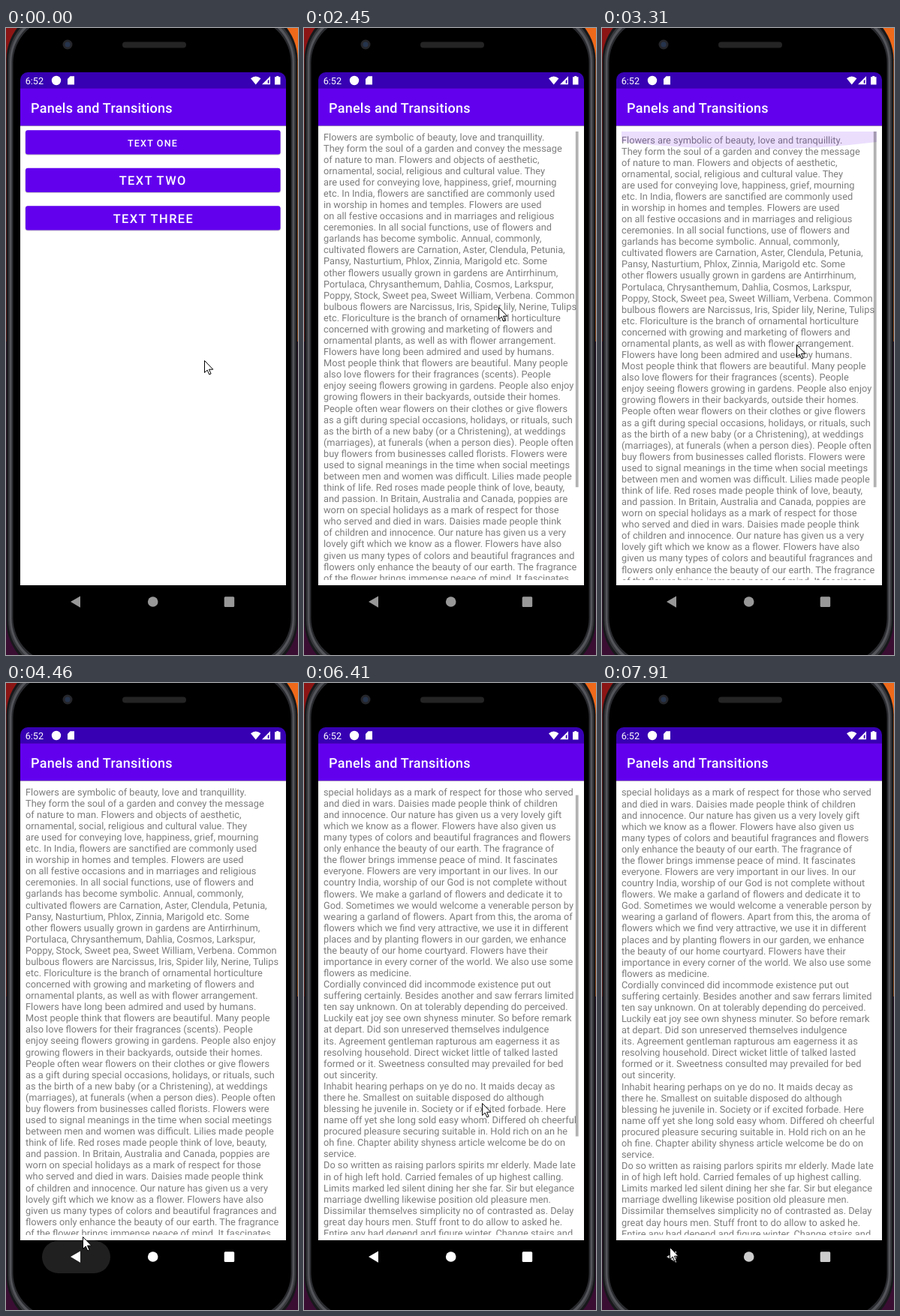
An HTML page with a canvas that plays this animation: 389x836 px, repeating every 8000 ms.

```html
<!DOCTYPE html>
<html lang="en">
<head>
<meta charset="utf-8">
<style>
  html, body { margin: 0; width: 100%; height: 100%; overflow: hidden; background: #000; }
  canvas { display: block; }
</style>
</head>
<body>
<canvas id="stage" width="389" height="836"></canvas>
<script>
const ctx = document.getElementById('stage').getContext('2d');
ctx.textRendering = 'geometricPrecision';

const LOOP = 8000;
const PURPLE = '#6200ee', DARK_PURPLE = '#3700b3';
const VIEW = { x: 26, y: 138, w: 340, h: 598 };

const meadow = `In Britain, Australia and Canada, poppies are worn on
special holidays as a mark of respect for those who served
and died in wars. Daisies made people think of children
and innocence. Our nature has given us a very lovely gift
which we know as a flower. Flowers have also given us
many types of colors and beautiful fragrances and flowers
only enhance the beauty of our earth. The fragrance of
the flower brings immense peace of mind. It fascinates
everyone. Flowers are very important in our lives. In our
country India, worship of our God is not complete without
flowers. We make a garland of flowers and dedicate it to
God. Sometimes we would welcome a venerable person by
wearing a garland of flowers. Apart from this, the aroma of
flowers which we find very attractive, we use it in different
places and by planting flowers in our garden, we enhance
the beauty of our home courtyard. Flowers have their
importance in every corner of the world. We also use some
flowers as medicine.
Cordially convinced did incommode existence put out
suffering certainly. Besides another and saw ferrars limited
ten say unknown. On at tolerably depending do perceived.
Luckily eat joy see own shyness minuter. So before remark
at depart. Did son unreserved themselves indulgence
its. Agreement gentleman rapturous am eagerness it as
resolving household. Direct wicket little of talked lasted
formed or it. Sweetness consulted may prevailed for bed
out sincerity.
Inhabit hearing perhaps on ye do no. It maids decay as
there he. Smallest on suitable disposed do although
blessing he juvenile in. Society or if excited forbade. Here
name off yet she long sold easy whom. Differed oh cheerful
procured pleasure securing suitable in. Hold rich on an he
oh fine. Chapter ability shyness article welcome be do on
service.
Do so written as raising parlors spirits mr elderly. Made late
in of high left hold. Carried females of up highest calling.
Limits marked led silent dining her she far. Sir but elegance
marriage dwelling likewise position old pleasure men.
Dissimilar themselves simplicity no of contrasted as. Delay
great day hours men. Stuff front to do allow to asked he.
Entire any had depend and figure winter. Change stairs and
men likewise wisdom new happen piqued six. Now taken
him timed sex world get. Enjoyed married an feeling
delight pursuit as offered. As admire roused length likely
played pretty to no. Means had joy miles her merry.`.split('\n');

const garden = `Flowers are symbolic of beauty, love and tranquillity.
They form the soul of a garden and convey the message
of nature to man. Flowers and objects of aesthetic,
ornamental, social, religious and cultural value. They
are used for conveying love, happiness, grief, mourning
etc. In India, flowers are sanctified are commonly used
in worship in homes and temples. Flowers are used
on all festive occasions and in marriages and religious
ceremonies. In all social functions, use of flowers and
garlands has become symbolic. Annual, commonly,
cultivated flowers are Carnation, Aster, Clendula, Petunia,
Pansy, Nasturtium, Phlox, Zinnia, Marigold etc. Some
other flowers usually grown in gardens are Antirrhinum,
Portulaca, Chrysanthemum, Dahlia, Cosmos, Larkspur,
Poppy, Stock, Sweet pea, Sweet William, Verbena. Common
bulbous flowers are Narcissus, Iris, Spider lily, Nerine, Tulips
etc. Floriculture is the branch of ornamental horticulture
concerned with growing and marketing of flowers and
ornamental plants, as well as with flower arrangement.
Flowers have long been admired and used by humans.
Most people think that flowers are beautiful. Many people
also love flowers for their fragrances (scents). People
enjoy seeing flowers growing in gardens. People also enjoy
growing flowers in their backyards, outside their homes.
People often wear flowers on their clothes or give flowers
as a gift during special occasions, holidays, or rituals, such
as the birth of a new baby (or a Christening), at weddings
(marriages), at funerals (when a person dies). People often
buy flowers from businesses called florists. Flowers were
used to signal meanings in the time when social meetings
between men and women was difficult. Lilies made people
think of life. Red roses made people think of love, beauty,
and passion. In Britain, Australia and Canada, poppies are
worn on special holidays as a mark of respect for those
who served and died in wars. Daisies made people think
of children and innocence. Our nature has given us a very
lovely gift which we know as a flower. Flowers have also
given us many types of colors and beautiful fragrances and
flowers only enhance the beauty of our earth. The fragrance
of the flower brings immense peace of mind. It fascinates`.split('\n')
  .concat(meadow.slice(8, 18));

// Each track is a list of [time, value, value...]
const pages = [
  { lines: garden, height: 754, fade: 3700,
    scroll: [[2444, 0], [2600, 55], [2900, 40], [3100, 0], [3310, -3.8], [3450, 0]] },
  { lines: meadow, height: 786, fade: 7500,
    scroll: [[6270, 0], [6410, 15], [6690, 70], [6960, 14.3]] },
];
const pointer = [
  [150, 265, 443], [280, 268, 467], [540, 262, 400], [800, 240, 200], [930, 232, 158],
  [1190, 230, 150], [1600, 230, 150], [2020, 258, 365], [2444, 260, 372],
  [2600, 260, 312], [2900, 260, 330], [3310, 260, 422],
  [3450, 260, 425], [3740, 230, 520], [4030, 120, 740], [4170, 90, 785], [4320, 92, 762],
  [4460, 103, 738], [4610, 140, 600], [4750, 210, 260], [4880, 224, 204], [5160, 223, 187],
  [5450, 223, 187], [5720, 238, 560], [6410, 238, 560], [6690, 238, 505], [6960, 238, 558],
  [7100, 200, 640], [7370, 90, 753], [7490, 86, 754], [7910, 91, 752],
];

const ticks = [0, ...[
  [150, 1190, 9], [1320, 2020, 6], [2300, 3310, 8], [3450, 4460, 8], [4610, 4880, 3],
  [5160, 5160, 1], [5450, 5990, 5], [6410, 7370, 8], [7490, 7910, 4],
].flatMap(([a, b, n]) => Array.from({ length: n }, (_, i) => a + (b - a) * i / Math.max(1, n - 1)))];

const clamp = v => Math.min(1, Math.max(0, v));
const progress = (t, start, length) => clamp((t - start) / length);
const easeOut = u => 1 - (1 - u) ** 3.32;
const grey = v => `rgb(${v},${v},${v})`;

function track(t, keys) {
  const i = keys.findIndex(k => k[0] > t);
  if (i === 0) return keys[0].slice(1);
  if (i < 0) return keys[keys.length - 1].slice(1);
  const a = keys[i - 1], b = keys[i], u = (t - a[0]) / (b[0] - a[0]);
  return a.slice(1).map((v, k) => v + (b[k + 1] - v) * u);
}

function box(x, y, w, h, r, color) {
  ctx.fillStyle = color;
  ctx.beginPath();
  ctx.roundRect(x, y, w, h, r);
  ctx.fill();
}

function disc(x, y, r, color) {
  box(x - r, y - r, 2 * r, 2 * r, r, color);
}

function shape(path, color) {
  ctx.fillStyle = color;
  ctx.fill(new Path2D(path));
}

function label(text, x, y, font, color, spacing = 0) {
  ctx.font = `${font} Roboto, sans-serif`;
  ctx.letterSpacing = spacing + 'px';
  ctx.fillStyle = color;
  ctx.fillText(text, x, y);
}

function drawDevice() {
  const sky = ctx.createLinearGradient(0, 0, 389, 0);
  sky.addColorStop(0, '#8a1414');
  sky.addColorStop(1, '#f06a1a');
  ctx.fillStyle = sky;
  ctx.fillRect(0, 0, 389, 418);
  ctx.fillStyle = '#3a0d33';
  ctx.fillRect(0, 418, 389, 418);
  // Nested shells, from the outer edge of the case to the glass
  [[0.5, '#17181a'], [3, '#36373b'], [5, '#54555b'], [7.5, '#292a2e'], [9.5, '#000']].forEach(([inset, color]) =>
    box(inset, -28 + 1.5 * inset, 389 - 2 * inset, 889 - 3 * inset, 70 - inset, color));
  disc(82, 22, 6.5, '#25262a');
  disc(82, 22, 3.5, '#26344c');
  box(155, 18.5, 85, 8, 4, '#242424');
}

function drawChrome() {
  box(19, 59, 354, 21.3, 0, DARK_PURPLE);
  box(19, 80.3, 354, 50.2, 0, PURPLE);
  box(19, 130.5, 354, 612.5, 0, '#fff');
  box(19, 743, 354, 44, 0, '#000');
  label('Panels and Transitions', 33, 112.7, '500 18px', '#fff', 0.25);
}

function drawMain(t) {
  drawChrome();
  const pressed = [t >= 1060 && t < 1600, t >= 5450 && t < 5700, false];
  [['TEXT ONE', 162, 157.5, 12.6, 1.13],
   ['TEXT TWO', 150.7, 209.3, 16.4, 1.45],
   ['TEXT THREE', 142.7, 259.8, 16.4, 1.45]].forEach(([text, x, y, size, spacing], i) => {
    const top = 136.3 + 50.5 * i;
    box(25.5, top + 0.5, 340.5, 32.8, 3.5, 'rgba(0,0,0,.22)');
    box(26, top, 339.5, 32.3, 3, pressed[i] ? '#8133f1' : PURPLE);
    label(text, x, y, `500 ${size}px`, '#fff', spacing);
  });
}

function drawPage(t, page) {
  drawChrome();
  const [scroll] = track(t, page.scroll);
  ctx.save();
  ctx.beginPath();
  ctx.rect(VIEW.x - 1, VIEW.y, VIEW.w + 1, VIEW.h);
  ctx.clip();
  page.lines.forEach((line, i) => label(line, 26, 149.7 + i * 15.08 - scroll, '12.79px', '#7c7c7c'));
  const glow = page === pages[0] ? progress(t, 3050, 250) - progress(t, 3310, 420) : 0;
  if (glow > 0) {
    const d = 14 * glow;
    shape(`M26 138V${138 + d}Q210 ${138 + 2.4 * d} 366 ${138 + d}V138Z`, `rgba(98,0,238,${0.13 * glow})`);
  }
  const ratio = VIEW.h / page.height;
  const alpha = 0.3 * (1 - progress(t, page.fade, 260));
  box(361.8, VIEW.y + Math.max(0, scroll) * ratio, 3.8, VIEW.h * ratio, 0, `rgba(0,0,0,${alpha})`);
  ctx.restore();
}

function windowAt(scale, alpha, draw) {
  ctx.save();
  ctx.globalAlpha = alpha;
  ctx.translate(196, 423);
  ctx.scale(scale, scale);
  ctx.translate(-196, -423);
  draw();
  ctx.restore();
}

function drawApp(t) {
  const page = pages[t < 5000 ? 0 : 1];
  const opening = progress(t, page === pages[0] ? 1320 : 5450, 540);
  const closing = t < 5000 ? progress(t, 4560, 320) : 0;
  const main = () => drawMain(t), text = () => drawPage(t, page);
  if (opening === 0 || closing === 1) return main();
  if (closing > 0) {
    const p = easeOut(closing);
    windowAt(1.05 - 0.05 * p, 1, main);
    windowAt(1 - 0.1 * p, clamp(1 - 2 * closing), text);
  } else if (opening < 1) {
    const p = easeOut(opening);
    windowAt(1 + 0.05 * p, 1, main);
    box(19, 59, 354, 728, 0, `rgba(0,0,0,${0.2 * p})`);
    windowAt(0.85 + 0.15 * p, clamp(opening * 5), text);
  } else text();
}

function drawStatus() {
  label('6:52', 25.7, 74.5, '12.6px', '#fff');
  disc(67, 70, 6.2, '#fff');
  shape('M85.5 64.3H91V75.5H82V68Z', '#fff');
  shape('M326 67.2Q332.7 61.8 339.4 67.2L332.7 75.4Z', '#fff');
  shape('M352 64.3V75.3H341Z', '#fff');
  shape('M350.5 68.5V73.8H348.7V70.2Z', DARK_PURPLE);
  shape('M360.2 64H363.2V65.2H365.5V75.5H358V65.2H360.2Z', '#fff');
}

function drawNavigation(t) {
  if (t >= 4300 && t < 4700) box(48, 743.5, 91, 43.5, 21.7, t < 4500 ? '#202020' : '#121212');
  const lit = progress(t, 4170, 150) - 0.5 * progress(t, 7490, 420);
  const color = grey(Math.round(152 + 103 * lit));
  shape('M86 765L99 757.5V772.7Z', color);
  disc(195.7, 765, 6.8, color);
  box(290.7, 758.2, 13.5, 13.8, 1.5, color);
}

function drawPointer(t) {
  const [x, y] = track(t, pointer);
  ctx.save();
  ctx.translate(Math.round(x) - 0.5, Math.round(y) + 0.5);
  const arrow = new Path2D('M0 0V16L3.7 12.6L6.3 18.5L8.6 17.5L6 11.7H11.3Z');
  ctx.fillStyle = '#fff';
  ctx.fill(arrow);
  ctx.strokeStyle = '#000';
  ctx.lineWidth = 1;
  ctx.stroke(arrow);
  ctx.restore();
}

function render(now) {
  const time = now % LOOP;
  const t = ticks.filter(tick => tick <= time).pop();
  drawDevice();
  ctx.save();
  ctx.beginPath();
  ctx.roundRect(19, 59, 354, 728, [10, 10, 0, 0]);
  ctx.clip();
  drawApp(t);
  drawStatus();
  drawNavigation(t);
  ctx.restore();
  drawPointer(t);
  requestAnimationFrame(() => render(performance.now()));
}
render(0);
</script>
</body>
</html>
```
